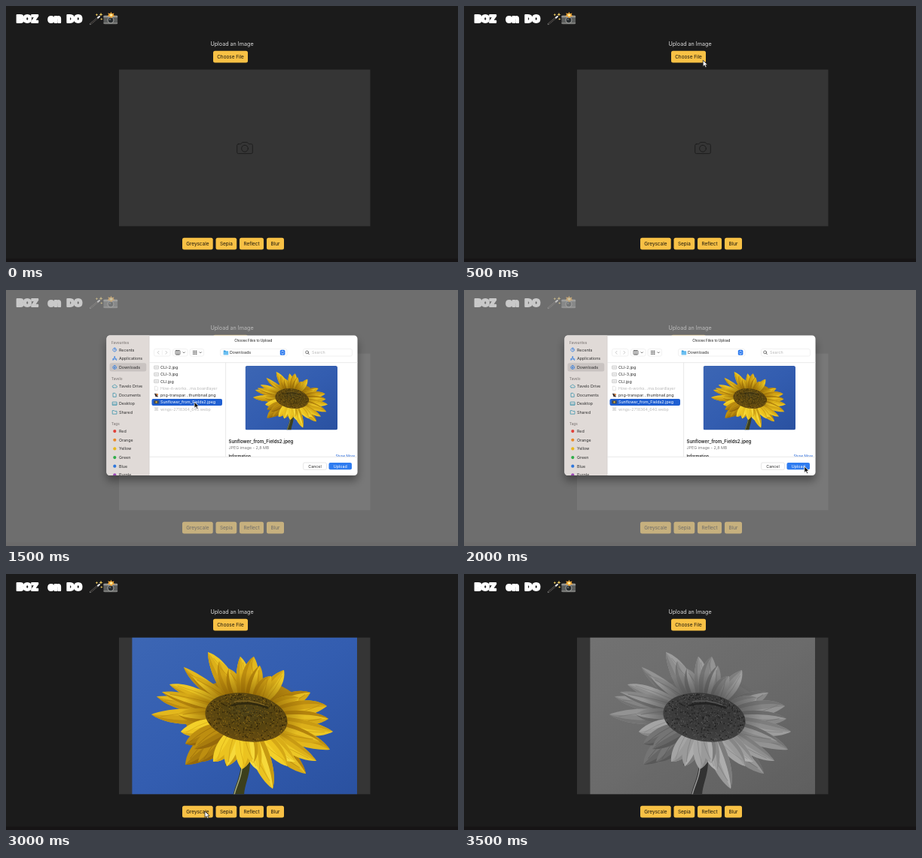
These frames come from a looping animation (600 by 341 pixels, 4000 ms). An HTML page:

```html
<!DOCTYPE html>
<html lang="en">
<head>
<meta charset="utf-8">
<title>Photo filters</title>
<style>
html, body { margin: 0; width: 100%; height: 100%; overflow: hidden; background: #1b1b1b; }
svg { display: block; width: 100vw; height: 100vh; font-family: Inter, Roboto, sans-serif; }
.logo { font-weight: 900; font-size: 13.6px; fill: #fff; stroke: #fff; stroke-width: 2; stroke-linejoin: round; }
.mid { text-anchor: middle; }
.head { font-size: 4.6px; font-weight: 600; fill: #8b8583; }
.item { font-size: 5.35px; fill: #2b2b2b; }
.off { fill: #b9b9b9; }
.line { fill: none; stroke-linecap: round; stroke-linejoin: round; }
</style>
</head>
<body>
<svg viewBox="0 0 600 341" preserveAspectRatio="none">
  <defs>
    <linearGradient id="sky" x1="0" y1="0" x2="1" y2="1">
      <stop offset="0" stop-color="#3c66b4"/>
      <stop offset=".5" stop-color="#335db0"/>
      <stop offset="1" stop-color="#2a51a0"/>
    </linearGradient>
    <radialGradient id="seed" cx=".5" cy=".35" r=".65">
      <stop offset="0" stop-color="#4a4019"/>
      <stop offset=".5" stop-color="#554310"/>
      <stop offset="1" stop-color="#674c10"/>
    </radialGradient>
    <radialGradient id="depth">
      <stop offset=".5" stop-color="#7a5200" stop-opacity=".6"/>
      <stop offset="1" stop-color="#7a5200" stop-opacity="0"/>
    </radialGradient>
    <filter id="grey" color-interpolation-filters="sRGB" x="0" y="0" width="1" height="1">
      <feColorMatrix values=".333 .333 .333 0 0 .333 .333 .333 0 0 .333 .333 .333 0 0 0 0 0 1 0"/>
    </filter>
    <filter id="shade" x="-.1" y="-.1" width="1.2" height="1.3">
      <feDropShadow dx="0" dy="7" stdDeviation="6" flood-color="#000" flood-opacity=".38"/>
    </filter>
    <clipPath id="photoBox"><rect x="167.4" y="84.7" width="298.6" height="208.6"/></clipPath>
    <clipPath id="thumbBox"><rect x="317.5" y="101" width="122.5" height="85.5" rx="2.5"/></clipPath>
    <clipPath id="panel"><rect x="133.5" y="60.5" width="333" height="186.5" rx="4.5"/></clipPath>
    <clipPath id="info"><rect x="292" y="97" width="175" height="125"/></clipPath>
    <g id="photo" clip-path="url(#photoBox)"></g>
  </defs>

  <rect width="600" height="341" fill="#1b1b1b"/>
  <rect y="336.5" width="600" height="5" fill="#161415"/>
  <g class="logo">
    <text x="14" y="22">BOZ</text><text x="55.7" y="22">en</text><text x="80.8" y="22">DO</text>
  </g>
  <g id="emoji">
    <path class="line" d="M112 24L124 14" stroke="#777" stroke-width="2.2"/>
    <path class="line" d="M112.6 23.5L122 15.7" stroke="#26221f" stroke-width="1.3"/>
    <path class="line" d="M122 15.6L124 14" stroke="#e8e8e8" stroke-width="2"/>
    <path d="M126 8.8l.8 1.9 1.9.5-1.9.7-.8 1.9-.7-1.9-1.9-.7 1.9-.5zM120.4 9.8l.6 1.4 1.4.5-1.4.5-.6 1.4-.5-1.4-1.4-.5 1.4-.5zM126.8 15.8l.5 1.2 1.2.4-1.2.5-.5 1.2-.5-1.2-1.2-.5 1.2-.4z" fill="#f3cf62"/>
    <rect x="129.5" y="12.2" width="18.6" height="12" rx="1.6" fill="#5b5d5c"/>
    <rect x="129.5" y="13.2" width="18.6" height="2" fill="#9a9b98"/>
    <rect x="129.5" y="22.2" width="18.6" height="1.3" fill="#8b8b88"/>
    <circle cx="139" cy="18.8" r="4.4" fill="#a0a19e"/>
    <circle cx="139" cy="18.8" r="3.4" fill="#292d30"/>
    <circle cx="138" cy="17.8" r="1.1" fill="#68777d"/>
    <path d="M139.5 7.7l1.2 2.6 2.8-.8-.9 2.4 2.2 1.6-3 .5-2.3 2.2-1.8-2.3-3.3-.1 2-2-1.2-2.4 3.2.6z" fill="#f2a534"/>
    <circle cx="139.6" cy="12.2" r="1.6" fill="#fff0a2"/>
  </g>
  <text class="mid" x="300" y="53" font-size="7.15" fill="#dedede">Upload an Image</text>
  <rect x="150" y="84.7" width="333.5" height="208.6" fill="#353535"/>
  <g class="line" stroke="#1d1d1d" stroke-width="1">
    <path d="M308.5 183.8h3.2l2-2.2h6.6l2 2.2h3.2q1.8 0 1.8 1.8v9.2q0 1.8-1.8 1.8h-17q-1.8 0-1.8-1.8v-9.2q0-1.8 1.8-1.8z"/>
    <circle cx="317" cy="189.8" r="4.4"/>
  </g>
  <g id="buttons"></g>
  <use id="shown" href="#photo"/>

  <g id="dialog">
    <rect width="600" height="341" fill="#a5a5a5" fill-opacity=".6"/>
    <rect x="133.5" y="60.5" width="333" height="186.5" rx="4.5" fill="#fff" filter="url(#shade)"/>
    <g clip-path="url(#panel)">
      <rect x="133" y="60" width="57" height="188" fill="#e0dad7"/>
      <path d="M190.2 60v188" stroke="#cfc9c6" stroke-width=".6"/>
      <path d="M190 96.7h277M190 222.3h277M291.6 97v125" stroke="#e2e2e2" stroke-width=".8"/>
      <rect x="137.5" y="97.3" width="48.8" height="11.3" rx="2.5" fill="#c9c3c1"/>
      <g id="side"></g>
    </g>
    <text class="mid" x="328.3" y="69.3" font-size="4.55" font-weight="500" fill="#333">Choose Files to Upload</text>
    <g fill="#fff" stroke="#ebebeb" stroke-width=".7">
      <rect x="196.5" y="78.5" width="21.5" height="9.6" rx="2.2"/>
      <rect x="221.5" y="78.5" width="19.5" height="9.6" rx="2.2"/>
      <rect x="244" y="78.5" width="18.5" height="9.6" rx="2.2"/>
      <rect x="284.5" y="78.5" width="88.5" height="9.6" rx="2.2"/>
      <rect x="394.5" y="78.5" width="65" height="9.6" rx="2.2"/>
    </g>
    <path d="M207.3 80v6.6" stroke="#e6e6e6" stroke-width=".6"/>
    <path class="line" d="M203 81.3l-1.8 2 1.8 2M212 81.3l1.8 2-1.8 2" stroke="#bdbdbd" stroke-width=".8"/>
    <g class="line" stroke="#555" stroke-width=".8">
      <rect x="225" y="80.6" width="6" height="5.4" rx=".8"/>
      <path d="M227 80.6v5.4M229 80.6v5.4M235 82.8l1.2 1.2 1.2-1.2M257 82.8l1.2 1.2 1.2-1.2"/>
    </g>
    <path d="M248 81.4h5.4M248 83.4h5.4M248 85.4h5.4" stroke="#555" stroke-width="1.4" stroke-dasharray="1.4 .6"/>
    <path d="M288.8 80.6h2.3l.8.8h3.2v4.8h-6.3z" fill="#3a9ee0"/>
    <path d="M288.8 82.3h6.3v3.9h-6.3z" fill="#6cc0f2"/>
    <text class="item" x="297" y="85.3">Downloads</text>
    <rect x="363.8" y="79.8" width="6.6" height="7" rx="1.6" fill="#2b79ee"/>
    <path class="line" d="M365.8 82.5l1.3-1.3 1.3 1.3M365.8 84.2l1.3 1.3 1.3-1.3" stroke="#fff" stroke-width=".8"/>
    <g class="line" stroke="#555" stroke-width=".8"><circle cx="399.6" cy="82.9" r="1.9"/><path d="M401 84.3l1.4 1.5"/></g>
    <text class="item off" x="406" y="85.3">Search</text>
    <rect id="pick" x="193.5" y="145" width="93.5" height="9" rx="2" fill="#1f5fd2"/>
    <g id="files"></g>
    <rect x="394.5" y="230" width="31" height="9.3" rx="2" fill="#fff" stroke="#ddd" stroke-width=".7"/>
    <text class="item mid" x="410" y="236.5">Cancel</text>
    <rect id="okBox" x="428.5" y="230" width="30.5" height="9.3" rx="2"/>
    <text id="okText" class="item mid" x="443.7" y="236.5">Upload</text>
    <g id="preview" clip-path="url(#info)">
      <g clip-path="url(#thumbBox)"><use href="#photo" transform="translate(317.5 101) scale(.4104) translate(-167.4 -84.8)"/></g>
      <text x="295.5" y="204" font-size="6.1" font-weight="600" fill="#222">Sunflower_from_Fields2.jpeg</text>
      <text class="item" x="295.5" y="212.4" style="fill:#777">JPEG image - 2,8 MB</text>
      <text x="295.5" y="222.6" font-size="5.3" font-weight="600" fill="#222">Information</text>
      <text x="437.5" y="222.6" font-size="4.8" fill="#2667d8">Show More</text>
    </g>
  </g>
  <path id="cursor" d="M0 0V8.4L2 6.6 3.4 9.6 4.9 8.9 3.6 6H6.2z" stroke-width=".8" stroke-linejoin="round"/>
</svg>
<script>
const $ = id => document.getElementById(id);
const text = (x, y, s, cls, extra = "") => `<text x="${x}" y="${y}" class="${cls}" ${extra}>${s}</text>`;
const path = (d, color, w = 0) => w
  ? `<path d="${d}" class="line" stroke="${color}" stroke-width="${w}"/>`
  : `<path d="${d}" fill="${color}"/>`;
const oval = (x, y, a, b, fill) => `<ellipse cx="${x}" cy="${y}" rx="${a}" ry="${b}" fill="${fill}"/>`;

// Sunflower: petals are given by tip x, tip y and half width
const cx = 319, cy = 191, rx = 54, ry = 31;
const back = [
  [236,124,10],[247,136,11],[217,147,11],[200,163,11],[207,157,10],[268,104,15],[283,116,14],
  [296,126,13],[311,110,12],[329,110,15],[337,122,12],[369,128,13],[352,136,12],[404,158,13],
  [389,165,13],[426,176,14],[428,193,13],[434,210,13],[430,234,14],[416,223,12],[238,254,19],
  [255,250,14],[398,266,15],[412,249,12],[193,187,13],[228,187,12]
];
const front = [
  [232,210,13],[238,226,14],[250,233,13],[275,250,14],[293,256,14],[384,250,14],[373,256,13],
  [354,286,15],[336,262,13],[313,260,15],[328,252,12]
];
// Each tone: body, shaded side, inner fold
const dim = ["#bd8e10", "#96690a", "#a97c0d"];
const warm = [["#e3b81d", "#bd8d10", "#d2a316"], ["#d6a917", "#b3830d", "#e6be22"], ["#ecc725", "#c99b13", "#dcb01a"]];
const bright = [["#f3d029", "#d5a816", "#ecc31f"], ["#eac321", "#c79a12", "#f6d93a"], ["#f7dc3e", "#d9ad18", "#edc826"]];

function petal([x, y, w], tone, i) {
  const a = Math.atan2((y - cy) / ry, (x - cx) / rx);
  const bx = cx + rx * .82 * Math.cos(a), by = cy + ry * .82 * Math.sin(a);
  const dx = x - bx, dy = y - by, len = Math.hypot(dx, dy);
  const nx = -dy / len, ny = dx / len, bend = (i % 3 - 1) * 3;
  const at = (f, s) => `${(bx + dx * f + nx * (s + bend * f)).toFixed(1)} ${(by + dy * f + ny * (s + bend * f)).toFixed(1)}`;
  const leaf = (s1, s2) => `M${at(0, s1 * .6)}C${at(.35, s1)} ${at(.78, s1 * .8)} ${x} ${y}C${at(.78, s2 * .8)} ${at(.35, s2)} ${at(0, s2 * .6)}z`;
  return path(leaf(w, -w), tone[0])
    + path(leaf(-w * .45, -w), tone[1])
    + path(leaf(w * .1, -w * .5), tone[2])
    + path(`M${at(.1, w * .45)}Q${at(.5, w * .4)} ${at(.85, 0)}`, tone[1], .7);
}

function seeds() {
  let state = 7;
  const rand = () => (state = state * 16807 % 2147483647) / 2147483647;
  const d = ["", "", ""];
  for (let i = 0; i < 700; i++) {
    const r = Math.sqrt(rand()), a = rand() * 2 * Math.PI;
    const x = cx + rx * r * Math.cos(a), y = cy + ry * r * Math.sin(a);
    d[i % 3] += `M${x.toFixed(1)} ${y.toFixed(1)}h0`;
  }
  return path(d[1], "#322508", 1.7) + path(d[2], "#755712", 1.3) + path(d[0], "#9d7719", 1.1);
}

const pick = (set, p, i) => p[0] < 262 && p[1] > 215 ? dim : set[i % 3];
const ring = (set, list) => list.map((p, i) => petal(p, pick(set, p, i), i)).join("");

$("photo").innerHTML = `<rect x="167" y="84" width="300" height="210" fill="url(#sky)"/>`
  + path("M312 250C312 268 305 279 301.5 294H316C317 280 324 268 324 250z", "#3c3f1c")
  + path("M313 257C313 270 306 281 303 294", "#a5ab86", 1.4)
  + oval(317, 189, 80, 50, "#b88a12")
  + path("M258 236l-5 12M287 230l-4 14M293 236l-1 18", "#3c4018", 1.4)
  + ring(warm, back) + oval(cx - 4, cy - 6, 82, 54, "url(#depth)") + ring(bright, front)
  + `<g transform="rotate(9 ${cx} ${cy})">${oval(cx, cy, rx + 1, ry + 1, "url(#seed)")}${seeds()}`
  + path("M298 178Q318 168 345 174", "#2f280e", 2.6) + path("M300 173Q319 166 340 171", "#8e7029", 1) + "</g>";

$("buttons").innerHTML = [
  [275, 59.8, 46, "Choose File"], [234, 308.7, 40.7, "Greyscale"], [278.5, 308.7, 27.7, "Sepia"],
  [310, 308.7, 32, "Reflect"], [346, 308.7, 23, "Blur"]
].map(([x, y, w, s]) => `<rect x="${x}" y="${y}" width="${w}" height="15.8" rx="2.5" fill="#f8c145"/>`
  + text(x + w / 2, y + 10.3, s, "mid", 'font-size="6.4" fill="#18140b"')).join("");

const icons = [
  "M144.2 77.2a2.4 2.4 0 1 0 .01 0M144.2 78.3v1.5h1.2",
  "M142 93.6l2.4-5M144 88.6l2.6 5M141.4 92h5.6",
  "M144.2 100.6a2.4 2.4 0 1 0 .01 0M144.2 101.7v2.4m-1-1l1 1 1-1",
  "M142.6 130h3.6a1.2 1.2 0 0 0 0-2.4a2 2 0 0 0-3.6-.4a1.4 1.4 0 0 0 0 2.8",
  "M142.4 137.4h2.4l1.4 1.4v3.6h-3.8z",
  "M141.6 149.2h5.4v4.2h-5.4zM141.6 152h5.4",
  "M141.6 160.6h2l.7.8h2.7v3.8h-5.4z"
];
const places = [["Recents", 81.5], ["Applications", 93], ["Downloads", 104.8], ["Tavelo Drive", 130], ["Documents", 141.8], ["Desktop", 153.4], ["Shared", 165]];
const tags = [["Red", "#e0403a"], ["Orange", "#e8892b"], ["Yellow", "#e9b91f"], ["Green", "#2fae4a"], ["Blue", "#2d77dd"], ["Purple", "#9a49b5"]];
$("side").innerHTML = [["Favourites", 71.5], ["Tavelo", 120], ["Tags", 180]].map(([s, y]) => text(140, y, s, "head")).join("")
  + places.map(([s, y], i) => text(150, y, s, "item") + path(icons[i], i < 3 ? "#2f7be0" : "#3e95ad", .8)).join("")
  + tags.map(([s, c], i) => {
    const y = 190 + i * 11.65;
    return `<circle cx="144.3" cy="${y - 1.9}" r="2.1" fill="${c}"/>` + text(150, y, s, "item");
  }).join("");

const names = ["CLI-2.jpg", "CLI-3.jpg", "CLI.jpg", "How-it-works...ma.boardlayer", "png-transpar...thumbnail.png", "Sunflower_from_Fields2.jpeg", "wings-2718364_640.webp"];
const fileIcon = (i, y) => {
  const box = (fill, edge) => `<rect x="196.6" y="${y - 2.2}" width="6" height="4.2" rx=".4" fill="${fill}" stroke="${edge}" stroke-width=".5"/>`;
  if (i < 3) return box("#f1f1f1", "#aaa") + path(`M198 ${y}h3`, "#bbb", .5);
  if (i === 3) return path(`M197.8 ${y - 2.6}h2.4l1.2 1.2v4h-3.6z`, "#d5d5d5", .6);
  if (i === 4) return path(`M197 ${y - 2.4}l3 .6 2 4.2-3.6-.4z`, "#3b3030") + `<circle cx="200.8" cy="${y - .8}" r="1.2" fill="#d88a4a"/>`;
  if (i === 5) return box("#33415f", "#555") + `<circle cx="199.6" cy="${y}" r="1.3" fill="#d4a82a"/>`;
  return path(`M197.4 ${y - 1.6}h4.4M198 ${y}h3.2M197.4 ${y + 1.6}h4.4`, "#bbb", .8);
};
$("files").innerHTML = names.map((s, i) => {
  const y = 103.2 + i * 9.23;
  return fileIcon(i, y) + text(205, y + 2, s, i === 3 || i === 6 ? "item off" : "item", i === 5 ? 'id="chosen"' : "");
}).join("");

// Cursor tip at each half-second step
const spots = { 1: [317.2, 72.3], 3: [250, 149], 4: [451.8, 235], 6: [264, 316] };
const show = (id, on) => { $(id).style.display = on ? "" : "none"; };

function draw(ms) {
  const step = Math.floor(ms % 4000 / 500);
  const open = step >= 2 && step <= 4, picked = step === 3 || step === 4;
  show("dialog", open);
  show("pick", picked);
  show("preview", picked);
  show("shown", step >= 5);
  $("shown").setAttribute("filter", step === 7 ? "url(#grey)" : "none");
  $("chosen").style.fill = picked ? "#fff" : "#2b2b2b";
  $("okBox").setAttribute("fill", picked ? "#2f7cf0" : "#f3f3f3");
  $("okText").style.fill = picked ? "#fff" : "#b5b5b5";
  const spot = spots[step], cursor = $("cursor");
  show("cursor", spot);
  if (spot) {
    cursor.setAttribute("transform", `translate(${spot})`);
    cursor.setAttribute("fill", open ? "#111" : "#fff");
    cursor.setAttribute("stroke", open ? "#fff" : "#222");
  }
}

let start;
function tick(now) {
  start ??= now;
  draw(now - start);
  requestAnimationFrame(tick);
}
draw(0);
requestAnimationFrame(tick);
</script>
</body>
</html>
```
